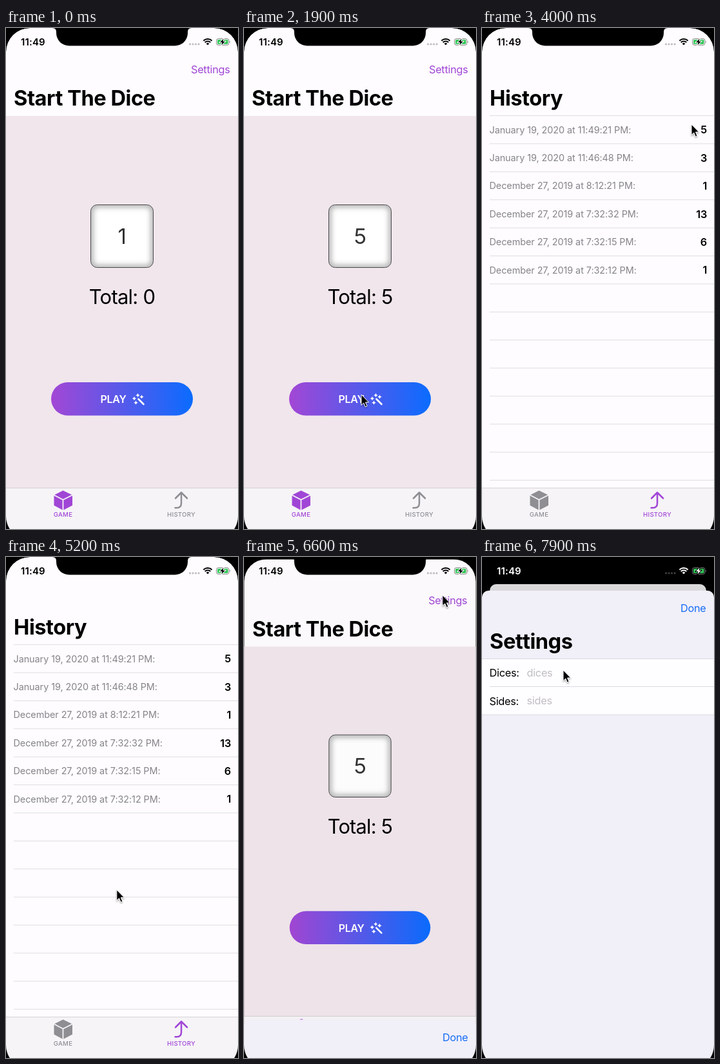
Write an HTML page that moves like this. It is 360 px wide and 775 px high and loops after 8000 ms.

```html
<!DOCTYPE html>
<html lang="en">
<head>
<meta charset="utf-8">
<title>Dice game</title>
<style>
  html, body { margin: 0; width: 100%; height: 100%; overflow: hidden; background: #000; }
  svg { display: block; }
  text { font: 16.3px Inter, sans-serif; letter-spacing: -.017em; }
  .title { font-size: 32.6px; font-weight: 700; letter-spacing: -.014em; }
  .end { text-anchor: end; }
  .mid { text-anchor: middle; }
  .date { font-size: 14.4px; letter-spacing: -.004em; fill: #85848a; }
  .score { font-weight: 600; text-anchor: end; }
  .hint { fill: #c0bec4; }
  .tab { color: #8e8e93; }
  .tab.on { color: #a046d6; }
  .tab text { font-size: 9.6px; font-weight: 500; letter-spacing: .03em; text-anchor: middle; fill: currentColor; }
</style>
</head>
<body>
<svg width="360" height="775" viewBox="0 0 360 775">
  <defs>
    <linearGradient id="fade"><stop stop-color="#a347d5"/><stop offset="1" stop-color="#0a6cff"/></linearGradient>
    <filter id="blur"><feGaussianBlur stdDeviation="4.5"/></filter>
    <filter id="shadow" x="-50%" y="-50%" width="220%" height="220%">
      <feDropShadow dx="0" dy="1.5" stdDeviation="1.2" flood-opacity=".4"/>
    </filter>
    <clipPath id="cardClip"><rect id="cardShape"/></clipPath>
    <clipPath id="dieClip"><rect x="131.5" y="273.5" width="97" height="97" rx="10"/></clipPath>
    <path id="star" d="M0-3.6Q.5-.5 3.6 0 .5.5 0 3.6-.5.5-3.6 0-.5-.5 0-3.6Z"/>
    <path id="bolt" d="M337.6 16.6L332 22.2H335.4L334.4 26.4 340 20.8H336.6Z"/>
    <mask id="boltGap" maskUnits="userSpaceOnUse" x="320" y="10" width="40" height="24">
      <rect x="320" y="10" width="40" height="24" fill="#fff"/>
      <use href="#bolt" stroke="#000" stroke-width="2"/>
    </mask>
  </defs>
  <rect width="360" height="775"/>

  <g clip-path="url(#cardClip)">
    <g id="app">
      <rect x="-10" width="380" height="785" fill="#fefcfe"/>
      <g id="game">
        <rect x="-10" y="136" width="380" height="600" fill="#f0e6ec"/>
        <text class="end" x="347.5" y="70" fill="#a046d6">Settings</text>
        <text class="title" x="12" y="120">Start The Dice</text>
        <g clip-path="url(#dieClip)">
          <rect x="131" y="273" width="98" height="98" fill="#fff"/>
          <rect x="131" y="273" width="98" height="98" rx="10" fill="none" stroke="#8a8a8a" stroke-width="8" opacity=".75" filter="url(#blur)"/>
        </g>
        <rect x="131.5" y="273.5" width="97" height="97" rx="10" fill="none" stroke="#48464a"/>
        <text id="die" class="mid" x="180" y="334" fill="#333" style="font-size:33px"></text>
        <text id="total" class="mid" x="180" y="427" style="font-size:31px;letter-spacing:-.025em"></text>
        <g id="play">
          <rect x="70" y="548" width="220" height="51.5" rx="25.75" fill="url(#fade)"/>
          <text x="146.5" y="580" fill="#fff" style="font-size:16px;font-weight:600">PLAY</text>
          <g fill="#fff">
            <use href="#star" x="199" y="573"/>
            <use href="#star" x="204.5" y="568"/>
            <use href="#star" x="210.5" y="570.5"/>
            <use href="#star" x="201.5" y="579.5"/>
            <path d="M205.5 574L213.5 582" stroke="#fff" stroke-width="2.6" stroke-linecap="round"/>
          </g>
        </g>
      </g>
      <g id="history">
        <text class="title" x="12" y="120">History</text>
      </g>
      <rect x="-10" y="712" width="380" height="70" fill="#f6f4f7"/>
      <path d="M-10 711.7H370" stroke="#d3d1d5"/>
      <g class="tab" id="gameTab">
        <path d="M88.5 715.5L103 722.5V738.5L88.5 746 74.5 738.5V722.5Z" fill="currentColor"/>
        <path d="M74 722.3L88.5 729.7 103.5 722.3M88.5 729.7V747" fill="none" stroke="#f6f4f7" stroke-width="1.8"/>
        <text x="88.5" y="756">GAME</text>
      </g>
      <g class="tab" id="historyTab">
        <path d="M262.5 742.3H265Q272 742.3 272 735V719M263 727.5L272 718.5 281 727.5" fill="none" stroke="currentColor" stroke-width="2.5" stroke-linecap="round" stroke-linejoin="round"/>
        <text x="272" y="756">HISTORY</text>
      </g>
      <rect id="dim" x="-10" width="380" height="785"/>
    </g>
  </g>

  <g id="sheet">
    <rect width="360" height="800" rx="10" fill="#f1eff8"/>
    <text class="end" x="347.5" y="33" fill="#166ef5">Done</text>
    <text class="title" x="12" y="90">Settings</text>
    <rect y="105" width="360" height="87" fill="#fefdff"/>
    <path d="M0 105.5H360M12 148.5H360M0 192H360" stroke="#dcdbe2"/>
    <text x="11.5" y="133">Dices:</text><text class="hint" x="69.5" y="132.5">dices</text>
    <text x="11.5" y="176.5">Sides:</text><text class="hint" x="69.5" y="175.5">sides</text>
  </g>

  <!-- The rounded screen runs on below the stage -->
  <path fill-rule="evenodd" d="M0 0H360V792H0ZM37 0A37 37 0 0 0 0 37V755A37 37 0 0 0 37 792H323A37 37 0 0 0 360 755V37A37 37 0 0 0 323 0Z"/>
  <path d="M72 0Q78 0 78 6V8A20 20 0 0 0 98 27.6H262A20 20 0 0 0 282 8V6Q282 0 288 0Z"/>
  <g id="status" fill="currentColor">
    <text x="23" y="26.5" style="font-size:15px;font-weight:600;letter-spacing:.01em">11:49</text>
    <path d="M285.5 25h.01m4.5 0h.01m4.5 0h.01m4.5 0h.01" stroke="currentColor" stroke-width="3.2" stroke-linecap="round" opacity=".25"/>
    <path d="M313 26.5L310.7 24.2A3.3 3.3 0 0 1 315.3 24.2Z"/>
    <path d="M308.7 22.2A6.1 6.1 0 0 1 317.3 22.2M306.4 19.7A9.4 9.4 0 0 1 319.6 19.7" fill="none" stroke="currentColor" stroke-width="2"/>
    <g mask="url(#boltGap)">
      <rect x="326.5" y="16.5" width="19.5" height="10" rx="3" fill="none" stroke="currentColor" opacity=".45"/>
      <rect x="328" y="18" width="16.5" height="7" rx="1.6" fill="#34c759"/>
    </g>
    <path d="M347.2 19.8Q349 21.5 347.2 23.3Z" opacity=".5"/>
    <use href="#bolt"/>
  </g>

  <path id="cursor" d="M0 0V16.5L3.8 13 6.3 19 9 17.9 6.5 12H11.6Z" stroke="#fff" stroke-width="1" filter="url(#shadow)"/>
</svg>
<script>
const LOOP = 8000, STEP = 100;
const PRESS = 1000, ROLLED = 1200, TO_HISTORY = 2800, TO_GAME = 5700, SHEET = 6557;
const $ = id => document.getElementById(id);

const results = [
  ['January 19, 2020 at 11:49:21 PM:', 5],
  ['January 19, 2020 at 11:46:48 PM:', 3],
  ['December 27, 2019 at 8:12:21 PM:', 1],
  ['December 27, 2019 at 7:32:32 PM:', 13],
  ['December 27, 2019 at 7:32:15 PM:', 6],
  ['December 27, 2019 at 7:32:12 PM:', 1],
];
let rows = '';
for (let i = 0; i < 14; i++) {
  const y = 135.6 + i * 43.38;
  rows += `<path d="M12 ${y}H370" stroke="#dfdde2"/>`;
  if (results[i]) {
    const [date, score] = results[i];
    rows += `<text class="date" x="11.5" y="${y + 27}">${date}</text>
      <text class="score" x="349" y="${y + 27.8}">${score}</text>`;
  }
}
$('history').innerHTML += rows;

// Cursor stops: time, x, y
const stops = [
  [300, 258, 680], [900, 182, 567], [1900, 182, 567], [2600, 272, 741],
  [3600, 272, 741], [4000, 325, 149], [4400, 309, 160], [4700, 304, 168],
  [4800, 304, 168], [5500, 86, 740], [5700, 86, 740], [6400, 308, 59],
  [7400, 308, 59], [7900, 126, 175], [LOOP, 126, 175],
];
function cursorAt(t) {
  const i = Math.max(1, stops.findIndex(s => s[0] > t));
  const [t0, x0, y0] = stops[i - 1], [t1, x1, y1] = stops[i];
  const u = Math.max(0, (t - t0) / (t1 - t0)), k = u * u * (3 - 2 * u);
  return [x0 + (x1 - x0) * k, y0 + (y1 - y0) * k];
}

// Critically damped spring from 0 to 1
function spring(ms) {
  const w = Math.max(0, ms) * .011;
  return 1 - (1 + w) * Math.exp(-w);
}

function set(id, attrs) {
  for (const name in attrs) $(id).setAttribute(name, attrs[name]);
}
function show(id, on) { $(id).style.display = on ? '' : 'none'; }

function draw(t) {
  const inHistory = t >= TO_HISTORY && t < TO_GAME;
  show('game', !inHistory);
  show('history', inHistory);
  $('gameTab').classList.toggle('on', !inHistory);
  $('historyTab').classList.toggle('on', inHistory);

  const rolled = t >= ROLLED;
  $('die').textContent = rolled ? 5 : 1;
  $('total').textContent = 'Total: ' + (rolled ? 5 : 0);
  set('play', { opacity: t >= PRESS && t < ROLLED ? .5 : 1 });

  const p = spring(t - SHEET), lead = Math.min(1, p * 1.2), scale = 1 - lead / 15;
  const inset = 12 * p ** 1.4;
  set('cardShape', { x: inset, y: 42 * p, width: 360 - 2 * inset, height: 900, rx: 37 - 27 * lead });
  set('app', { transform: `translate(${180 * (1 - scale)} ${42 * p}) scale(${scale})` });
  set('dim', { opacity: .14 * p });
  show('sheet', p > 0);
  set('sheet', { transform: `translate(0 ${775 - 723 * p})` });
  const v = Math.round(255 * p ** 5);
  set('status', { color: `rgb(${v},${v},${v})` });

  show('cursor', t >= stops[0][0]);
  set('cursor', { transform: `translate(${cursorAt(t)})` });
}

function tick() {
  draw(Math.floor(performance.now() % LOOP / STEP) * STEP);
  requestAnimationFrame(tick);
}
tick();
</script>
</body>
</html>
```
